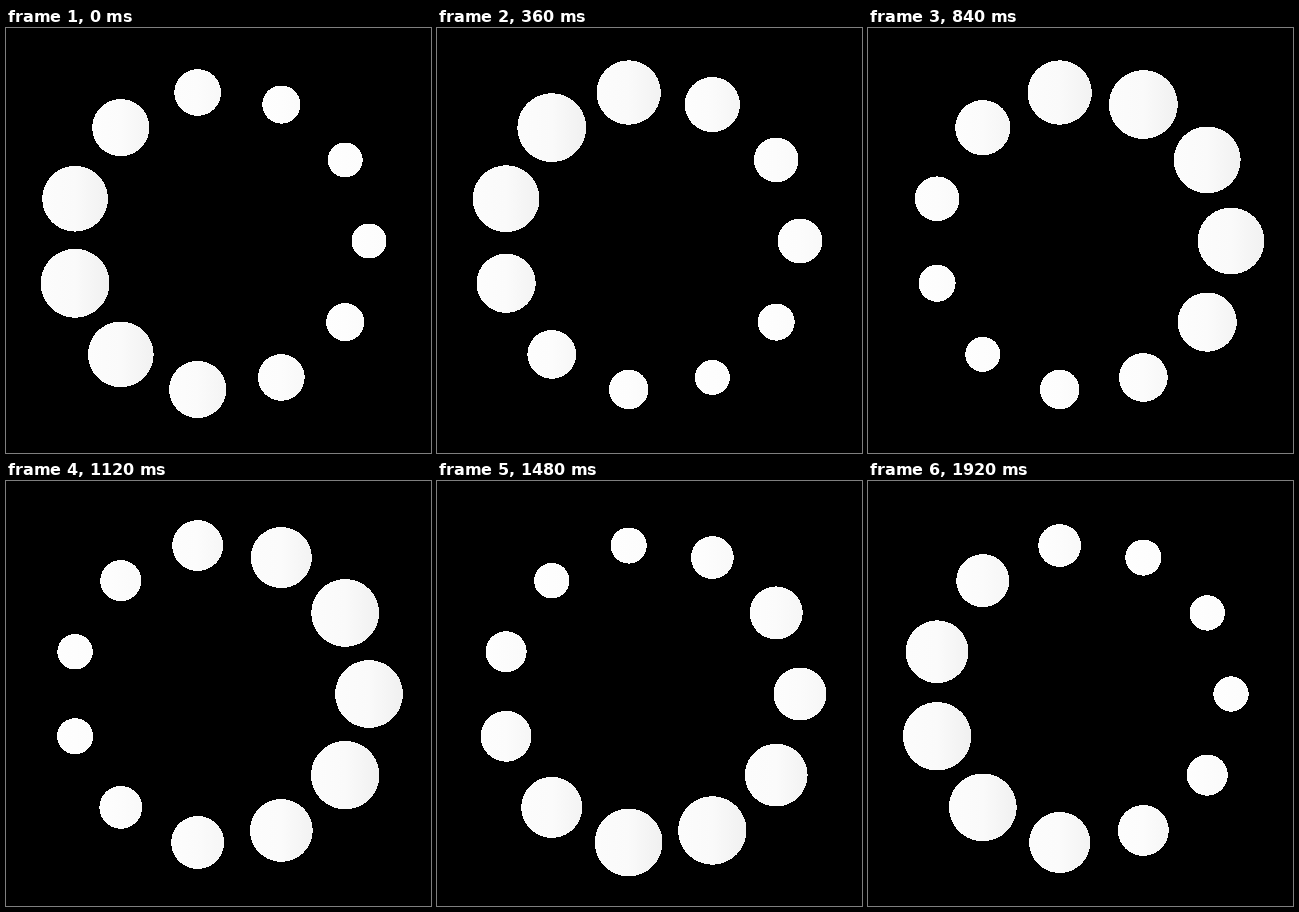
An HTML page with a canvas that plays this animation: 425x425 px, repeating every 1.96 s.

```html
<!DOCTYPE html>
<html lang="en">
<head>
<meta charset="utf-8">
<title>Loading ring</title>
<style>
  html, body { margin: 0; width: 100%; height: 100%; overflow: hidden; background: #000; }
  canvas { display: block; width: 425px; height: 425px; }
</style>
</head>
<body>
<canvas id="stage" width="425" height="425"></canvas>
<script>
const ctx = document.getElementById('stage').getContext('2d');
const SIZE = 425, CENTER = 213, RING = 150, DOTS = 11;
const LOOP = 1960, STEP = 40, PERIOD = 2000;
const TAU = Math.PI * 2;
const EDGE = 0.4; // crisp dots also fill partly covered pixels

const grey = v => `rgb(${v},${v},${v})`;

function dotFill(x, r, swell) {
  const fill = ctx.createLinearGradient(x - r, 0, x + r, 0);
  fill.addColorStop(0, grey(Math.round(254 - 2 * swell)));
  fill.addColorStop(0.5, grey(Math.round(253 - 3 * swell)));
  fill.addColorStop(1, grey(Math.round(252 - 12 * swell)));
  return fill;
}

// Fill a disc row by row so its rim stays free of antialiasing.
function disc(x, y, r) {
  const reach = r + EDGE;
  for (let row = Math.floor(y - reach); row <= y + reach; row++) {
    const dy = row + 0.5 - y;
    if (Math.abs(dy) > reach) continue;
    const half = Math.sqrt(reach * reach - dy * dy);
    const left = Math.ceil(x - half - 0.5);
    const right = Math.floor(x + half - 0.5);
    ctx.fillRect(left, row, right - left + 1, 1);
  }
}

function draw(t) {
  ctx.fillStyle = '#000';
  ctx.fillRect(0, 0, SIZE, SIZE);
  for (let k = 0; k < DOTS; k++) {
    const angle = k * TAU / DOTS;
    const x = CENTER + RING * Math.cos(angle);
    const y = CENTER + RING * Math.sin(angle);
    // Ten phase steps around the ring: first and last dot pulse together.
    const swell = (1 + Math.cos(TAU * ((k - 5) / 10 - t / PERIOD))) / 2;
    const r = 17 + 17 * swell;
    ctx.fillStyle = dotFill(x, r, swell);
    disc(x, y, r);
  }
}

const start = performance.now();
function tick() {
  const t = (performance.now() - start) % LOOP;
  draw(Math.floor(t / STEP) * STEP);
  requestAnimationFrame(tick);
}
tick();
</script>
</body>
</html>
```
